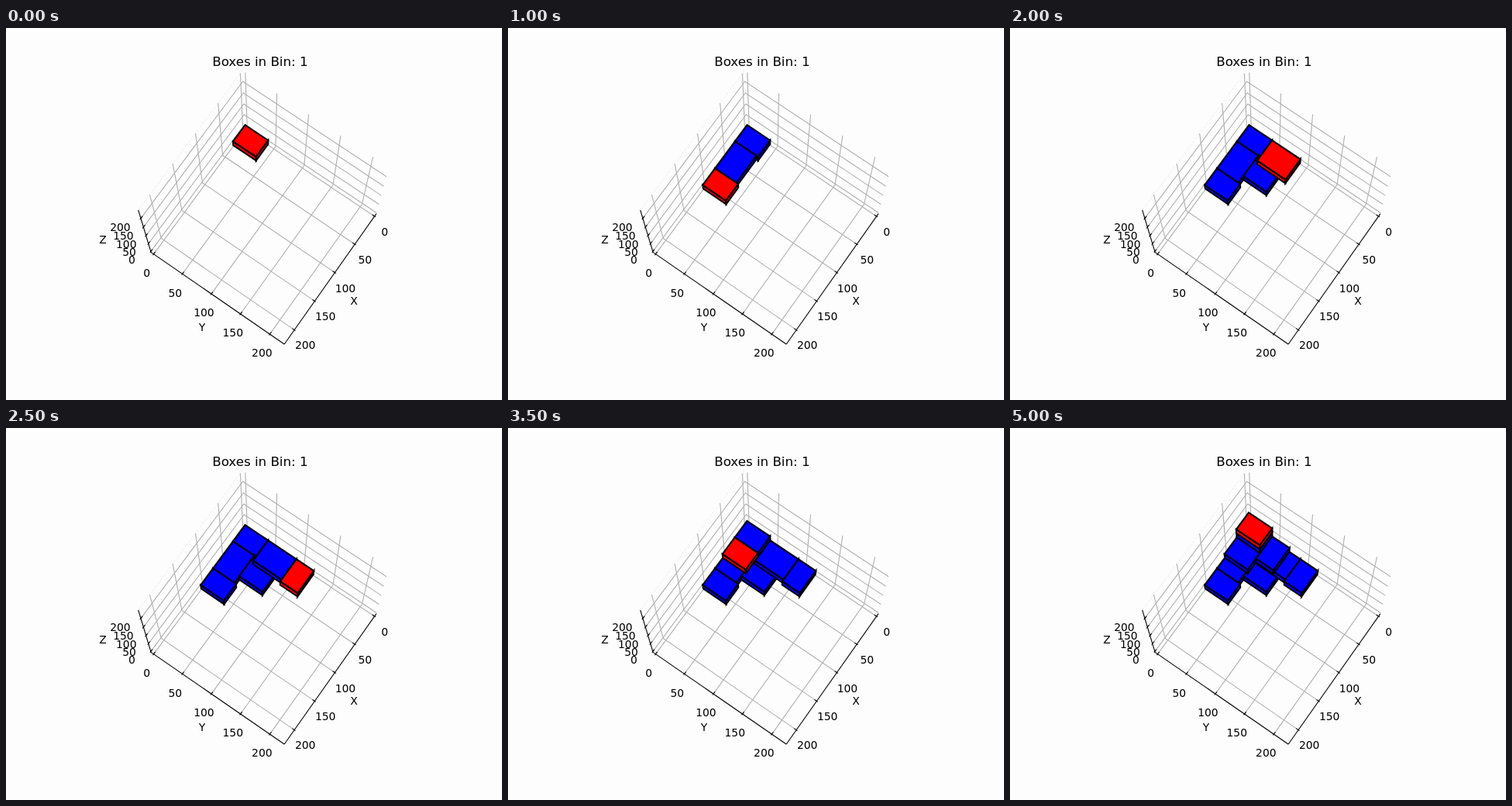
Animation, 640 px wide and 480 px high, one loop 5500 ms. Source, as an HTML page:

```html
<!DOCTYPE html>
<html lang="en">
<head>
<meta charset="utf-8">
<title>Boxes in Bin</title>
<style>
  html, body { margin: 0; width: 100%; height: 100%; overflow: hidden; background: #fdfdfd; }
  svg { display: block; width: 640px; height: 480px; }
  text { font: 13.89px "DejaVu Sans", sans-serif; text-anchor: middle; fill: #000; }
  .title { font-size: 16.67px; }
  .grid { fill: none; stroke: #b0b0b0; stroke-width: 1.11; }
  .axis { fill: none; stroke: #000; stroke-width: 1.11; }
  .pane { fill: none; stroke: #efefef; stroke-width: 1; stroke-dasharray: 4 2; }
  .box { stroke: #000; stroke-width: 2.08; stroke-linejoin: miter; }
</style>
</head>
<body>
<svg id="stage" viewBox="0 0 640 480"></svg>
<script>
const NS = 'http://www.w3.org/2000/svg';
const stage = document.getElementById('stage');
const STEP = 500;
const TICKS = [0, 50, 100, 150, 200];

// Perspective camera around a cube whose axes carry a small margin.
const rad = Math.PI / 180;
const elev = 75 * rad, azim = 35 * rad;
const SIDE = 1.1004, DISTANCE = 10, SCALE = 1997.8;
const CENTER = [333, 237.4];
const EXTENT = [220, 220, 240];
const lo = EXTENT.map(e => -e / 48);
const hi = EXTENT.map(e => e + e / 48);
const span = EXTENT.map(e => e * 25 / 24);

function project(point) {
  const [x, y, z] = point.map((v, i) => ((v - lo[i]) / span[i] - 0.5) * SIDE);
  const out = x * Math.cos(azim) + y * Math.sin(azim);
  const right = y * Math.cos(azim) - x * Math.sin(azim);
  const up = z * Math.cos(elev) - out * Math.sin(elev);
  const depth = DISTANCE - out * Math.cos(elev) - z * Math.sin(elev);
  return [CENTER[0] + SCALE * right / depth, CENTER[1] - SCALE * up / depth];
}

function add(parent, tag, attrs) {
  const node = document.createElementNS(NS, tag);
  for (const key in attrs) node.setAttribute(key, attrs[key]);
  return parent.appendChild(node);
}

const toPoints = corners =>
  corners.map(c => project(c).map(v => v.toFixed(2)).join()).join(' ');

const line = (cls, ...corners) =>
  add(stage, 'polyline', { class: cls, points: toPoints(corners) });

function label(str, x, y, cls = '') {
  add(stage, 'text', { x, y, class: cls }).textContent = str;
}

function drawAxes() {
  const [x0, y0, z0] = lo, [x1, y1, z1] = hi;
  line('pane', [x1, y0, z1], [x0, y0, z1]);
  for (const t of TICKS) {
    line('grid', [t, y1, z0], [t, y0, z0], [t, y0, z1]);
    line('grid', [x1, t, z0], [x0, t, z0], [x0, t, z1]);
    line('grid', [x1, y0, t], [x0, y0, t], [x0, y1, t]);
  }
  line('axis', [x0, y1, z0], [x1, y1, z0]);
  line('axis', [x1, y0, z0], [x1, y1, z0]);
  line('axis', [x1, y0, z0], [x1, y0, z1]);

  const pad = span.map(s => s * 0.083);
  const inner = span[0] / 60, outer = span[0] / 120;
  const tickLabel = (value, at) => {
    const [x, y] = project(at);
    label(value, x, y + 11.6);
  };
  for (const t of TICKS) {
    line('axis', [t, y1 - inner, z0], [t, y1 + outer, z0]);
    line('axis', [x1 - inner, t, z0], [x1 + outer, t, z0]);
    line('axis', [x1 - inner, y0, t], [x1 + outer, y0, t]);
    tickLabel(t, [t, y1 + pad[1], z0 - pad[2]]);
    tickLabel(t, [x1 + pad[0], t, z0 - pad[2]]);
    tickLabel(t, [x1 + pad[0], y0 - pad[1], t]);
  }
  label('X', 449, 356.5);
  label('Y', 253, 390.5);
  label('Z', 125, 277.5);
  label('Boxes in Bin: 1', 327.9, 49, 'title');
}

// Each box: x, y, z, length along x, length along y. All are equally tall.
const HEIGHT = 20;
const boxes = [
  [0, 0, 0, 30, 40],
  [30, 0, 0, 49, 37],
  [79, 0, 0, 30, 40],
  [37, 37, 0, 30, 40],
  [0, 40, 0, 37, 49],
  [0, 89, 0, 40, 30],
  [0, 0, 20, 30, 40],
  [30, 0, 20, 30, 40],
  [0, 40, 20, 40, 30],
  [0, 0, 40, 30, 40],
  [0, 0, 60, 30, 40]
];

function drawBox([x, y, z, dx, dy]) {
  const X = x + dx, Y = y + dy, Z = z + HEIGHT;
  const group = add(stage, 'g', { class: 'box' });
  const faces = [
    [[X, y, z], [X, Y, z], [X, Y, Z], [X, y, Z]],
    [[x, Y, z], [X, Y, z], [X, Y, Z], [x, Y, Z]],
    [[x, y, Z], [X, y, Z], [X, Y, Z], [x, Y, Z]]
  ];
  for (const face of faces) add(group, 'polygon', { points: toPoints(face) });
  return group;
}

drawAxes();
const groups = boxes.map(drawBox);

function render(ms) {
  const newest = Math.floor(ms / STEP) % boxes.length;
  groups.forEach((group, i) => {
    group.setAttribute('visibility', i <= newest ? 'visible' : 'hidden');
    group.setAttribute('fill', i === newest ? '#f00' : '#00f');
  });
}

const start = performance.now();
function tick() {
  render(performance.now() - start);
  requestAnimationFrame(tick);
}
tick();
</script>
</body>
</html>
```
